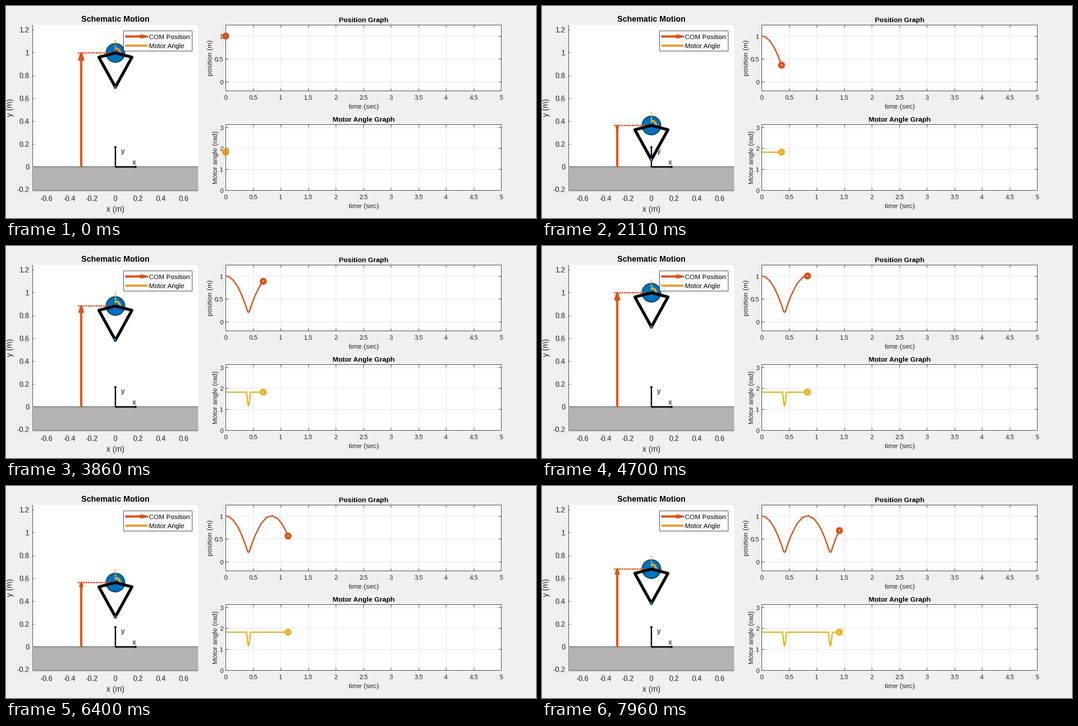
These frames come from a looping animation (1183 by 473 pixels, 8000 ms). A matplotlib script:

```python
import math

import matplotlib.pyplot as plt
import numpy as np
from matplotlib.animation import FuncAnimation
from matplotlib.patches import Circle, Polygon, Rectangle

W, H, DPI = 1183, 473, 64
PX = 72 / DPI  # one pixel in points
INTERVAL, FRAMES = 40, 200

INK, GRID, BACK = "#262626", "#dfdfdf", "#f0f0f0"
RED, GOLD, AMBER = "#d95319", "#edb120", "#e8951c"
BLUE, NAVY = "#0072bd", "#0b4f82"

# Hopper: free fall, short leg compression, free flight
G, LEG, THIGH, SHIN, APEX = 9.81, 0.3, 0.15, 0.3, 1.008
DROP = math.sqrt(2 * (1 - LEG) / G)
RISE = math.sqrt(2 * (APEX - LEG) / G)
STANCE, SQUASH = 0.072, 0.093
PERIOD = STANCE + 2 * RISE

# Playback clock: milliseconds against simulated hundredths of a second
CLOCK = [0, 50, 850, 910, 1450, 1690, 1790, 2580, 2630, 2780, 3380, 3470,
         3860, 4230, 4290, 5080, 5130, 5500, 5930, 5990, 6400, 6790, 6830,
         7620, 7670, 7960]
STEPS = [0, 1, 14, 15, 25, 30, 31, 45, 46, 49, 60, 61, 68, 75, 76, 90, 91,
         97, 105, 106, 113, 120, 121, 135, 136, 141]


def height(t):
    if t < DROP:
        return 1 - G / 2 * t * t
    u = (t - DROP) % PERIOD
    if u < STANCE:
        return LEG - SQUASH * math.sin(math.pi * u / STANCE)
    return APEX - G / 2 * (u - STANCE - RISE) ** 2


def motor_angle(y):
    leg = min(y, LEG)
    return math.acos((SHIN**2 - THIGH**2 - leg**2) / (2 * THIGH * leg))


# The solver's coarse samples, joined by straight chords
stances = [np.linspace(0, STANCE, 10) + DROP + n * PERIOD for n in (0, 1)]
knots = np.concatenate([
    [0, 0.03, 0.07, 0.14, 0.22, 0.29, 0.35], stances[0],
    [0.48, 0.535, 0.64, 0.745, 0.845, 0.955, 1.025, 1.08, 1.135, 1.18],
    stances[1], [1.31, 1.36, 1.47]])
heights = np.array([height(t) for t in knots])
angles = np.array([motor_angle(y) for y in heights])

fig = plt.figure(figsize=(W / DPI, H / DPI), dpi=DPI, facecolor=BACK)
ax = fig.add_axes([0, 0, 1, 1])
ax.set_xlim(0, W)
ax.set_ylim(H, 0)
ax.axis("off")


def mid(v):
    """Centre of the pixel that holds v."""
    return math.floor(v) + 0.5


def line(xs, ys, color=INK, width=1, z=2, **kw):
    kw.setdefault("solid_capstyle", "butt")
    kw.setdefault("solid_joinstyle", "round")
    return ax.plot(xs, ys, color=color, lw=width * PX, zorder=z, snap=False,
                   **kw)[0]


def box(x0, y0, x1, y1, face="white", edge="none", z=1):
    ax.add_patch(Rectangle((x0, y0), x1 - x0, y1 - y0, facecolor=face,
                           edgecolor=edge, lw=PX, zorder=z, snap=False))


def label(x, y, s, size, ha="center", color=INK, z=3, **kw):
    """Text whose capitals are centred on height y."""
    ax.text(x, y + 0.36 * size, s, fontsize=size * PX, ha=ha, va="baseline",
            family="Liberation Sans", color=color, zorder=z, **kw)


def side_label(x, y, s, size):
    ax.text(x, y, s, fontsize=size * PX, ha="center", va="baseline",
            family="Liberation Sans", color=INK, rotation=90,
            rotation_mode="anchor", zorder=3)


# Schematic panel
CX, GROUND, SCALE = 244.2, 359, 254.3
LEFT, RIGHT, TOP, BOTTOM = 59.5, 429, 42.5, 411.5


def px(x):
    return CX + SCALE * x


def py(y):
    return GROUND - SCALE * y


box(LEFT, TOP, RIGHT, BOTTOM)
line([LEFT, LEFT], [TOP, BOTTOM])
for i in range(-1, 7):
    y = mid(py(i / 5))
    line([LEFT, LEFT + 4], [y, y])
    label(52, y, f"{i / 5:g}", 16, ha="right")
for i in range(-3, 4):
    label(CX + i * 50.7 - (2 if i < 0 else 0), 429.7, f"{i / 5:g}", 16)
box(LEFT, GROUND, RIGHT, BOTTOM, face="#b3b3b3", z=2.1)
for y in (GROUND, BOTTOM):
    line([LEFT, RIGHT], [y, y], "#999999", 3.5, 2.2)
label(244.5, 28.2, "Schematic Motion", 17.8, weight="bold", color="black")
label(244.5, 453, "x (m)", 17.6)
side_label(14, 227, "y (m)", 17.6)

line([CX, CX, 289], [315, GROUND, GROUND], "black", 3, 3)
for x, y in ((CX, 315), (289, GROUND)):
    ax.add_patch(Circle((x, y), 2.5, color="black", lw=0, zorder=3))
label(286, 348.6, "x", 16, color="black")
label(261, 323, "y", 16, color="black")

# Legend
box(262.5, 55.5, 415.5, 100.5, edge=INK, z=10)
line([266, 303], [68, 68], RED, 5, 11)
ax.add_patch(Polygon([(300, 63), (317.5, 66.5), (317.5, 69.5), (300, 73)],
                     color=RED, lw=0, zorder=11))
line([266, 316], [88.5, 88.5], AMBER, 4.5, 11)
label(319.5, 68.7, "COM Position", 14.7, ha="left", color="black", z=11)
label(319.5, 88.3, "Motor Angle", 14.7, ha="left", color="black", z=11)

# Graph panels
GX0, GX1 = 490.5, 1105.5
SEC = (GX1 - GX0) / 5


def graph(top, bottom, zero, unit, ticks, title, ylabel, label_x):
    box(GX0, top, GX1, bottom)
    for i in range(11):
        x = mid(GX0 + i * SEC / 2)
        line([x, x], [top, bottom], GRID, 1, 1.5)
        line([x, x], [bottom, bottom - 6])
        line([x, x], [top, top + 6])
        label(x - 0.5, bottom + 14, f"{i / 2:g}", 14)
    for v in ticks:
        y = mid(zero - unit * v)
        line([GX0, GX1], [y, y], GRID, 1, 1.5)
        line([GX0, GX0 + 6], [y, y])
        line([GX1, GX1 - 6], [y, y])
        label(485, y + 0.4, f"{v:g}", 14, ha="right")
    box(GX0, top, GX1, bottom, face="none", edge=INK, z=2.5)
    label(798.5, top - 12, title, 15.4, weight="bold", color="black")
    label(798.5, bottom + 33.5, "time (sec)", 15.4)
    side_label(label_x, (top + bottom) / 2, ylabel, 15.4)


P_ZERO, P_UNIT = 169.1, 102
A_ZERO, A_UNIT = 411.5, 46.8
graph(42.5, 189.5, P_ZERO, P_UNIT, (0, 0.5, 1), "Position Graph",
      "position (m)", 460)
graph(264.5, 411.5, A_ZERO, A_UNIT, (0, 1, 2, 3), "Motor Angle Graph",
      "Motor angle (rad)", 472)


def marker(color):
    ring = Circle((0, 0), 4.7, fill=False, edgecolor=color, lw=6.2 * PX,
                  zorder=6)
    return ax.add_patch(ring)


pos_curve, pos_mark = line([], [], RED, 3, 5), marker(RED)
ang_curve, ang_mark = line([], [], GOLD, 3, 5), marker(GOLD)

# Moving parts of the schematic
ARROW_X = px(-0.3)
wheel = ax.add_patch(Circle((CX, 0), 20.5, facecolor=BLUE, edgecolor=NAVY,
                            lw=3 * PX, zorder=4))
shaft = line([], [], RED, 5, 4)
head = ax.add_patch(Polygon([(0, 0)] * 3, facecolor=RED, edgecolor=RED,
                            lw=4.5 * PX, joinstyle="round", zorder=4))
level = line([], [], RED, 3, 4.5, dashes=(1.4, 0.5), dash_capstyle="butt")
upright = line([], [], GOLD, 3, 4.6, dashes=(1.6, 0.6), dash_capstyle="butt")
arc = line([], [], GOLD, 4.5, 4.6)
links = line([], [], "black", 6.5, 5, solid_capstyle="round")
foot = ax.add_patch(Circle((CX, 0), 3, facecolor=BLUE, edgecolor=NAVY,
                           lw=2 * PX, zorder=6))


def trace(curve, ring, t, values, zero, unit):
    """Put the ring at time t; the curve ends one step behind it."""
    last = max(t - 0.01, 0)
    past = knots < last
    ts = np.append(knots[past], last)
    ys = np.append(values[past], np.interp(last, knots, values))
    curve.set_data(GX0 + SEC * ts, zero - unit * ys)
    now = np.interp(t, knots, values)
    ring.center = GX0 + SEC * t, zero - unit * now
    return now


def update(n):
    step = math.floor(np.interp((n + 0.5) * INTERVAL, CLOCK, STEPS) + 0.01)
    t = step / 100
    y = trace(pos_curve, pos_mark, t, heights, P_ZERO, P_UNIT)
    trace(ang_curve, ang_mark, t, angles, A_ZERO, A_UNIT)
    theta = motor_angle(y)
    gold = GOLD if step else AMBER
    for part in (ang_curve, upright, arc):
        part.set_color(gold)
    ang_mark.set_edgecolor(gold)

    hip = py(y)
    wheel.center = CX, hip
    size = GROUND - hip
    base = hip + 0.06 * size
    shaft.set_data([ARROW_X] * 2, [GROUND, base])
    head.set_xy([(ARROW_X, hip), (ARROW_X - 0.018 * size, base),
                 (ARROW_X + 0.018 * size, base)])
    level.set_data([CX, 160.5], [hip, hip])
    upright.set_data([CX, CX], [hip, hip - 29.5])
    sweep = np.linspace(0, theta, 24)
    arc.set_data(CX + 10.5 * np.sin(sweep), hip - 10.5 * np.cos(sweep))

    knee_x, knee_y = THIGH * math.sin(theta), py(y + THIGH * math.cos(theta))
    toe = py(y - min(y, LEG))
    links.set_data([CX, px(knee_x), CX, px(-knee_x), CX],
                   [hip, knee_y, toe, knee_y, hip])
    foot.center = CX, toe
    return (pos_curve, pos_mark, ang_curve, ang_mark, wheel, shaft, head,
            level, upright, arc, links, foot)


anim = FuncAnimation(fig, update, frames=FRAMES, interval=INTERVAL,
                     init_func=lambda: update(0), repeat=True, repeat_delay=0,
                     blit=False)
plt.show()
```
